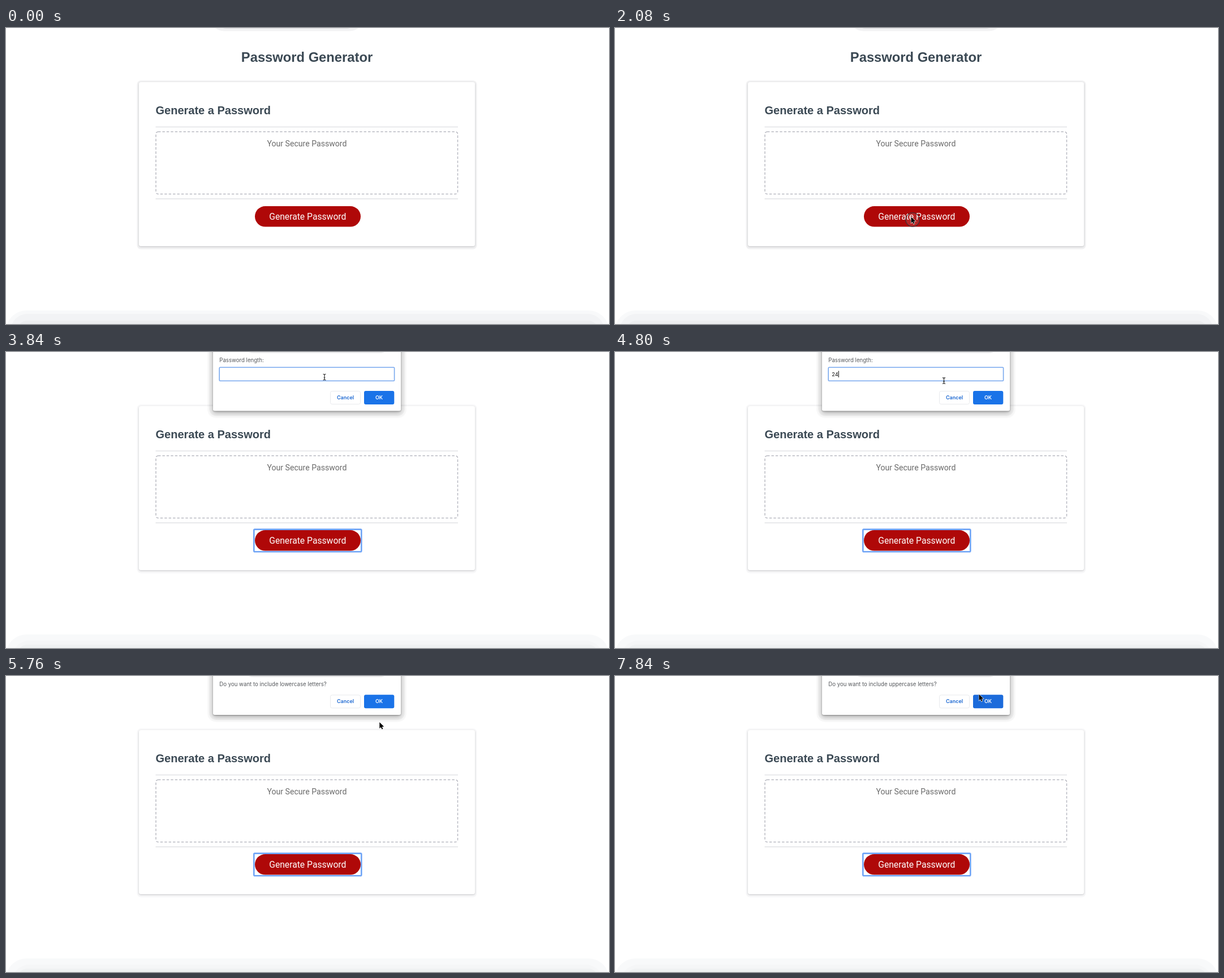
Recreate the animation shown at these times as an HTML page. Size 1066 by 525 pixels, loop 8 s.

```html
<!DOCTYPE html>
<html lang="en">
<head>
<meta charset="utf-8">
<title>Password Generator</title>
<style>
  html, body { margin: 0; width: 100%; height: 100%; overflow: hidden; background: #fff; }
  svg { display: block; width: 100vw; height: 100vh; }
  .head { font-family: "Liberation Sans", Arial, sans-serif; font-weight: 700; fill: #3b4954; }
  .page { font-family: Roboto, sans-serif; text-anchor: middle; }
  .ui { font-family: Inter, sans-serif; font-size: 9.65px; fill: #55585c; }
  .label { font-family: Inter, sans-serif; font-size: 9px; font-weight: 600; text-anchor: middle; }
  .rule { stroke: #e1e2e5; stroke-width: 1.4; }
  .card { fill: #fff; filter: drop-shadow(0 1px 1.5px rgba(60, 64, 67, .28)); }
  .sheet { fill: #fff; filter: drop-shadow(0 1px 1px rgba(0, 0, 0, .3)) drop-shadow(0 3px 4px rgba(0, 0, 0, .28)); }
</style>
</head>
<body>
<svg viewBox="0 0 1066 525" preserveAspectRatio="none">
  <g id="tip">
    <rect x="415" y="-60" width="270" height="65.5" rx="24" fill="#f3f3f4"/>
    <rect x="423" y="-60" width="252" height="61" rx="20" fill="#dcdddf"/>
  </g>

  <g id="footer">
    <rect x="0" y="501" width="1066" height="90" rx="36"/>
    <rect id="footMid" x="8" y="507" width="1050" height="90" rx="30"/>
    <rect x="20" y="519" width="1027" height="90" rx="18"/>
  </g>

  <text class="head" x="532" y="59.5" font-size="23.75" text-anchor="middle">Password Generator</text>

  <rect id="halo" x="231.5" y="93" width="601" height="299.5" rx="7"/>
  <rect class="card" x="235" y="96" width="594" height="291" rx="3.5"/>
  <text class="head" x="264.5" y="153" font-size="20">Generate a Password</text>
  <path class="rule" d="M264.5 175.5H799M264.5 303H799"/>
  <rect x="265" y="184" width="533.5" height="110.5" rx="4" fill="none" stroke="#b9bac2" stroke-width="1.5" stroke-dasharray="4.45 2.97"/>
  <text class="page" x="532" y="210" font-size="14.1" fill="#6b6b6b">Your Secure Password</text>
  <rect id="focus" x="438.3" y="314.6" width="190" height="39.6" rx="1.5" fill="none" stroke="#6fa4f6" stroke-width="2.6"/>
  <rect x="440" y="316" width="187" height="36.6" rx="18.3" fill="#af0808"/>
  <text class="page" x="533.3" y="340" font-size="15.7" fill="#fff">Generate Password</text>

  <g id="dialog">
    <rect id="outer" x="356" y="-60" width="352" rx="15" fill="#000" fill-opacity=".022"/>
    <rect id="inner" x="359" y="-60" width="346" rx="13" fill="#000" fill-opacity=".035"/>
    <rect id="sheet" class="sheet" x="366" y="-60" width="332" rx="3"/>
    <rect x="418" y="-40" width="262" height="42" rx="20" fill="#ececed"/>
    <text id="question" class="ui" x="377.3" y="17.8"></text>
    <g id="field">
      <rect x="377.2" y="27.3" width="309.4" height="24" rx="1.5" fill="#fff" stroke="#78a8ee" stroke-width="1.6"/>
      <text id="typed" class="ui" x="383.3" y="42.6" style="font-size:9.2px;fill:#111"></text>
      <rect id="caret" y="33.5" width="1" height="11.5" fill="#000"/>
    </g>
    <g id="buttons">
      <rect x="573.5" y="69.5" width="53" height="23" rx="3" fill="#fff" stroke="#e8eaed"/>
      <text class="label" x="600" y="84.2" fill="#1a67d2">Cancel</text>
      <rect id="ok" x="633" y="69" width="53.3" height="24" rx="3"/>
      <text class="label" x="659.5" y="84.2" fill="#fff">OK</text>
    </g>
  </g>

  <g id="pointer">
    <circle id="ring" cx="2.7" cy="5" r="12.3" fill="#fff" fill-opacity=".12" stroke="#30363d" stroke-width="1.1"/>
    <path id="arrow" d="M0 0V11L2.5 8.7L4.3 12.6L6.1 11.8L4.4 8L7.8 7.7Z" fill="#000" stroke="#fff" stroke-width="1.2" paint-order="stroke"/>
    <path id="beam" d="M-2.5 -5Q-.5 -5 0 -4Q.5 -5 2.5 -5M0 -4V4.5M-2.5 5.5Q-.5 5.5 0 4.5Q.5 5.5 2.5 5.5M-1.3 1.5H1.3" fill="none" stroke="#222" stroke-width="1.1"/>
  </g>
</svg>
<script>
const LOOP = 8000, TICK = 160;
const el = id => document.getElementById(id);
const set = (id, attrs) => { for (const k in attrs) el(id).setAttribute(k, attrs[k]); };
const show = (id, on) => { el(id).style.display = on ? "" : "none"; };
const inside = (x, y, l, t, r, b) => x >= l && x <= r && y >= t && y <= b;

// time, x, y of the pointer tip
const path = [
  [640, 654, 164], [960, 520, 320], [1120, 499, 349.5], [1280, 499, 349.5],
  [1440, 509, 343], [1600, 519, 338], [1760, 523.5, 335], [2720, 523.5, 335],
  [3200, 565, 205], [3520, 592, 88], [3840, 563, 44.3], [4640, 563, 44.3],
  [4960, 600, 57], [5280, 660.3, 82], [6080, 660.3, 82],
  [6720, 652, 42.5], [7680, 652, 42.5], [7840, 643.5, 32.5]
];
const clicks = [2080, 5440, 7040];
const dialogs = [
  { from: 2240, bottom: 104.5, text: "Password length:", prompt: true },
  { from: 5600, bottom: 69, text: "Do you want to include lowercase letters?" },
  { from: 7200, bottom: 69, text: "Do you want to include uppercase letters?" }
];

function pointerAt(t) {
  const i = path.findIndex(p => p[0] > t);
  if (i < 0) return path[path.length - 1].slice(1);
  const a = path[Math.max(i - 1, 0)], b = path[i];
  const k = Math.max(0, (t - a[0]) / (b[0] - a[0]));
  return [a[1] + (b[1] - a[1]) * k, a[2] + (b[2] - a[2]) * k];
}

function caretOn(t) {
  if (t < 4320) return t < 2880 || (t >= 3360 && t < 3840);
  return t < 4960 || t >= 5440;
}

function drawDialog(d, t, x, y, pressed) {
  show("dialog", d);
  if (!d) return;
  el("dialog").style.opacity = t === d.from ? 0.7 : 1;
  set("outer", { height: d.bottom + 72.5 });
  set("inner", { height: d.bottom + 69 });
  set("sheet", { height: d.bottom + 60 });
  el("question").textContent = d.text;
  const lift = d.prompt ? 0 : -35.7;
  set("buttons", { transform: `translate(0 ${lift})` });
  const hover = inside(x, y, 633, 68 + lift, 686, 93 + lift);
  set("ok", { fill: pressed ? "#4583d8" : hover ? "#1c6bdb" : "#1a73e8" });

  show("field", d.prompt);
  const typed = t < 4320 ? "" : t < 4480 ? "2" : "24";
  el("typed").textContent = typed;
  set("caret", { x: 383.2 + typed.length * 5.8 });
  show("caret", caretOn(t));
}

function drawPointer(t, x, y, d, clicked) {
  show("pointer", t >= path[0][0]);
  set("pointer", { transform: `translate(${x} ${y})` });
  const beam = d ? d.prompt && inside(x, y, 377, 27, 687, 52) : inside(x, y, 265, 184, 799, 294);
  show("beam", beam);
  show("arrow", !beam);
  show("ring", clicked);
}

function draw(ms) {
  const t = Math.floor(ms % LOOP / TICK) * TICK;
  const [x, y] = pointerAt(t);
  const d = dialogs.filter(q => t >= q.from).pop();
  const clicked = clicks.includes(t);

  const slide = Math.min(t / 320, 1);
  set("tip", { transform: `translate(${-53.5 * (1 - slide)} 0)` });

  const tones = d ? ["#f8f9fa", "#f5f6f7", "#eff1f2"] : ["#f8f9fa", "#f2f3f5", "#ecedef"];
  [...el("footer").children].forEach((r, i) => r.setAttribute("fill", tones[i]));
  set("footMid", d ? { x: 11, y: 512, width: 1044 } : { x: 8, y: 507, width: 1050 });
  set("halo", { fill: d ? "#f8f8f9" : "#f2f2f3" });
  show("focus", d);

  drawDialog(d, t, x, y, clicked);
  drawPointer(t, x, y, d, clicked);
}

const start = performance.now();
function loop() {
  draw(performance.now() - start);
  requestAnimationFrame(loop);
}
loop();
</script>
</body>
</html>
```
